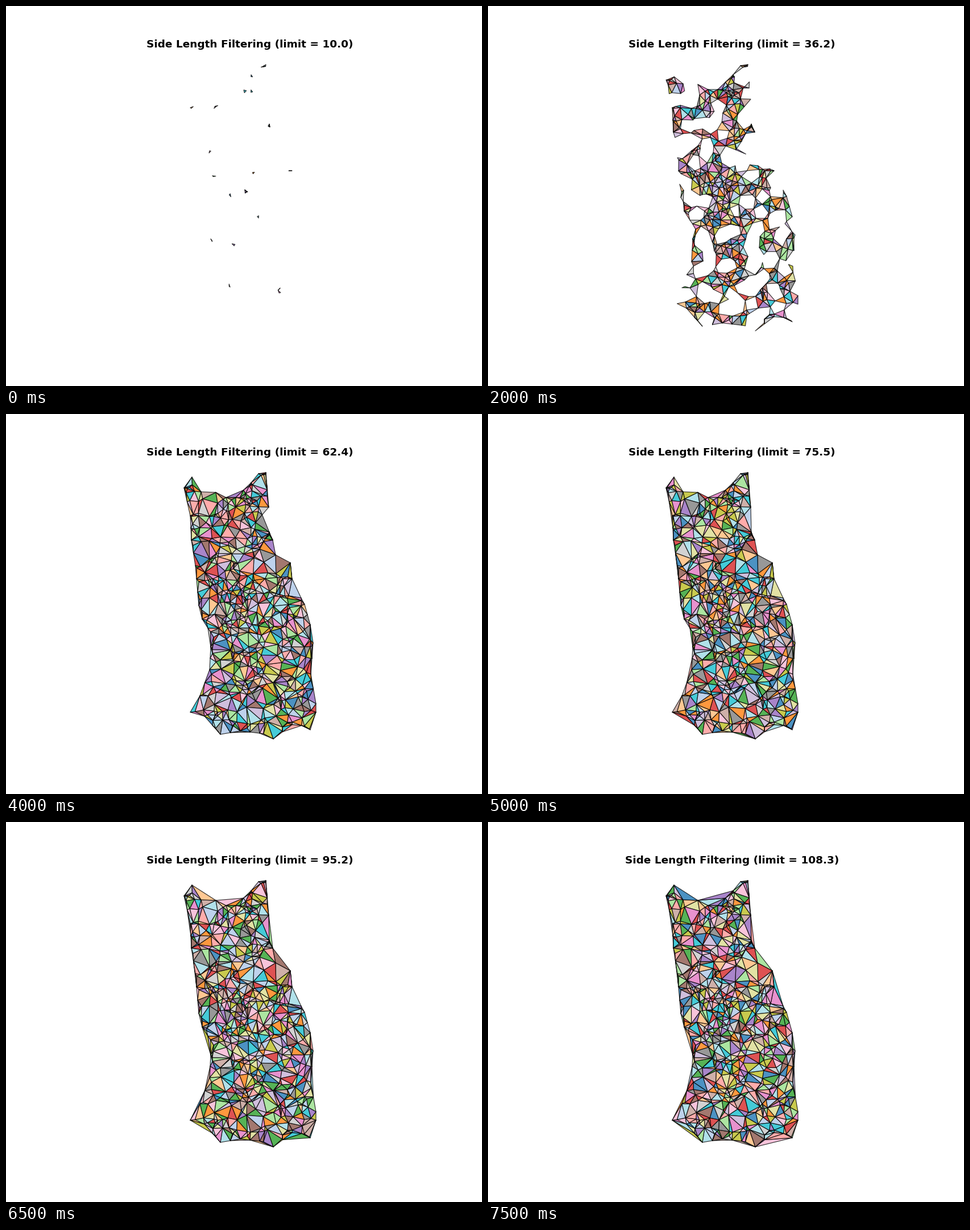
Write a matplotlib script that moves like this. It is 837 px wide and 669 px high and loops after 8 s.

```python
import numpy as np
import matplotlib.pyplot as plt
from matplotlib.animation import FuncAnimation
from matplotlib.collections import PolyCollection
from matplotlib.path import Path
from matplotlib.tri import Triangulation

W, H, DPI = 837, 669, 83.7
SCALE = 0.62            # pixels per unit of side length
N_INNER = 450
MAX_GAP = 60            # inner triangles with longer sides get an extra point
MAX_STEP = 34           # pixels between points along the outline
LIMITS = np.linspace(10, 200, 30)[:16]

# Silhouette of the sitting cat, clockwise from the left ear
OUTLINE = np.array([
    (327, 111), (343, 137), (369, 138), (387, 147), (404, 147), (431, 121),
    (444, 105), (457, 103), (462, 164), (439, 191), (463, 208), (469, 222),
    (446, 238), (474, 248), (500, 262), (503, 290), (475, 316), (519, 324),
    (525, 335), (535, 371), (540, 403), (536, 458), (545, 510), (545, 525),
    (535, 556), (503, 547), (470, 572), (446, 562), (412, 558), (377, 564),
    (349, 532), (324, 525), (341, 496), (358, 450), (360, 410), (365, 393),
    (345, 361), (339, 337), (333, 267), (326, 222), (324, 179), (313, 130),
], float)


def subdivide(ring):
    out = []
    for a, b in zip(ring, np.roll(ring, -1, axis=0)):
        steps = int(np.ceil(np.hypot(*(b - a)) / MAX_STEP))
        out += [a + (b - a) * k / steps for k in range(steps)]
    return np.array(out)


def triangulate(points):
    """Return the Delaunay triangles and the longest side of each."""
    tri = points[Triangulation(*points.T).triangles]
    sides = np.linalg.norm(tri - np.roll(tri, 1, axis=1), axis=2)
    return tri, sides.max(axis=1) / SCALE


def make_points(seed):
    rng = np.random.default_rng(seed)
    cat = Path(np.vstack([OUTLINE, OUTLINE[:1]]))
    inner = rng.uniform(OUTLINE.min(axis=0), OUTLINE.max(axis=0), (4000, 2))
    inner = inner[cat.contains_points(inner)][:N_INNER]
    points = np.vstack([subdivide(OUTLINE), inner])
    tri, longest = triangulate(points)
    gaps = tri[longest > MAX_GAP].mean(axis=1)
    return np.vstack([points, gaps[cat.contains_points(gaps)]])


triangles, longest = triangulate(make_points(seed=5))
palette = np.array(plt.get_cmap("tab20").colors)

fig = plt.figure(figsize=(W / DPI, H / DPI), dpi=DPI, facecolor="white")
ax = fig.add_axes([0, 0, 1, 1])
ax.set(xlim=(0, W), ylim=(H, 0))
ax.axis("off")
mesh = PolyCollection([], edgecolors="black", linewidths=1.0, alpha=0.8)
ax.add_collection(mesh, autolim=False)
title = ax.text(0.5125 * W, 73.3, "", ha="center", va="baseline",
                fontsize=15.92, fontweight="bold", family="DejaVu Sans")


def draw(i):
    keep = triangles[longest <= LIMITS[i]]
    rng = np.random.default_rng(100 + i)
    mesh.set_verts(keep)
    mesh.set_facecolor(palette[rng.integers(20, size=len(keep))])
    title.set_text(f"Side Length Filtering (limit = {LIMITS[i]:.1f})")
    return mesh, title


anim = FuncAnimation(fig, draw, frames=len(LIMITS), interval=500, repeat=True)
plt.show()
```
